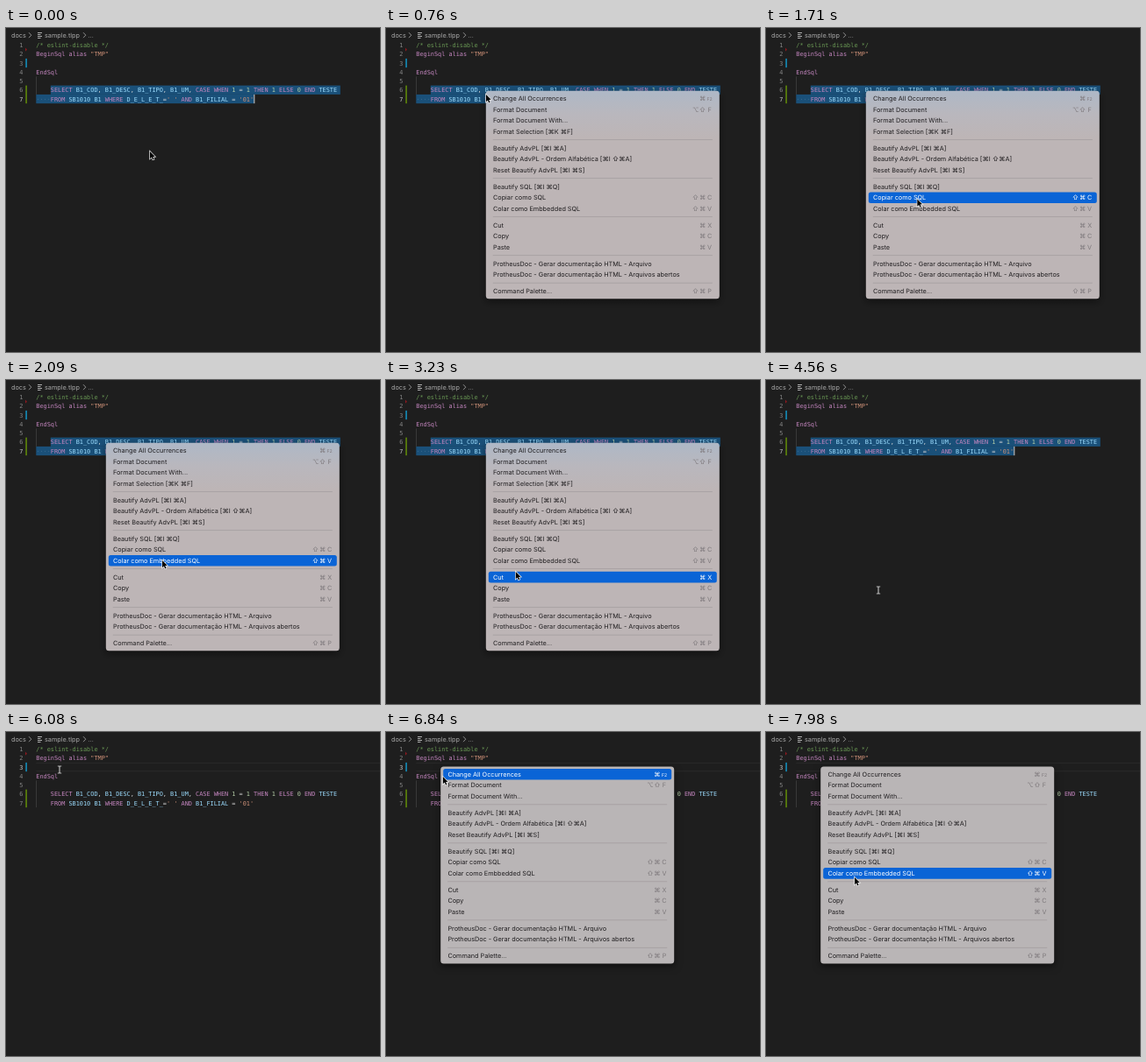
Write an HTML page with a canvas that moves like this. It is 426 px wide and 370 px high and loops after 8 s.

```html
<!DOCTYPE html>
<html lang="en">
<head>
<meta charset="utf-8">
<title>SQL paste menu</title>
<style>
html, body { margin: 0; width: 100%; height: 100%; overflow: hidden; background: #1e1e1e; }
canvas { display: block; }
</style>
</head>
<body>
<canvas id="stage" width="426" height="370"></canvas>
<script>
const ctx = document.getElementById('stage').getContext('2d');
const LOOP = 8000, STEP = 190;
const MONO = '6.86px "DejaVu Sans Mono", monospace';
const SANS = 'Inter, "DejaVu Sans", sans-serif';
const CHAR = 4.13, LINE = 10.25, CODE_X = 34.3;
const ROW = 12.55, GAP = 6.35, PAD = 2.5, MENU_W = 266;

const code = [
  '/* eslint-disable */',
  'BeginSql alias "TMP"',
  '',
  'EndSql',
  '',
  "    SELECT B1_COD, B1_DESC, B1_TIPO, B1_UM, CASE WHEN 1 = 1 THEN 1 ELSE 0 END TESTE",
  "    FROM SB1010 B1 WHERE D_E_L_E_T_=' ' AND B1_FILIAL = '01'"
];
const syntax = [
  [/^\/\*/, '#6a9955'],
  [/^['"]/, '#ce9178'],
  [/^(BeginSql|alias|EndSql|SELECT|CASE|WHEN|THEN|ELSE|END|FROM|WHERE|AND)$/, '#c586c0'],
  [/^\d/, '#b5cea8'],
  [/^\w/, '#9cdcfe'],
  [/./, '#d4d4d4']
];

// Label and shortcut keys; null is a separator.
const items = [
  ['Change All Occurrences', '⌘ F2'],
  ['Format Document', '⌥ ⇧ F'],
  ['Format Document With...'],
  ['Format Selection [⌘K ⌘F]'],
  null,
  ['Beautify AdvPL [⌘I ⌘A]'],
  ['Beautify AdvPL - Ordem Alfabética [⌘I ⇧⌘A]'],
  ['Reset Beautify AdvPL [⌘I ⌘S]'],
  null,
  ['Beautify SQL [⌘I ⌘Q]'],
  ['Copiar como SQL', '⇧ ⌘ C'],
  ['Colar como Embbedded SQL', '⇧ ⌘ V'],
  null,
  ['Cut', '⌘ X'],
  ['Copy', '⌘ C'],
  ['Paste', '⌘ V'],
  null,
  ['ProtheusDoc - Gerar documentação HTML - Arquivo'],
  ['ProtheusDoc - Gerar documentação HTML - Arquivos abertos'],
  null,
  ['Command Palette...', '⇧ ⌘ P']
];

// Pointer path: time, x, y.
const path = [
  [0, 164, 141], [570, 114, 72], [760, 114, 76], [1900, 177, 205], [2090, 178, 206],
  [2280, 168, 207], [2660, 158, 207], [2850, 158, 207], [3800, 129, 241], [4370, 129, 241],
  [4560, 128, 240], [5130, 61, 43], [6080, 61, 43], [6270, 62, 42], [6650, 62, 42],
  [7790, 101, 165], [7980, 101, 166]
];

function pointerAt(t) {
  const i = path.findIndex(p => p[0] >= t);
  if (i <= 0) return path[i < 0 ? path.length - 1 : 0].slice(1);
  const [t0, x0, y0] = path[i - 1], [t1, x1, y1] = path[i];
  const u = (t - t0) / (t1 - t0), k = u * u * (3 - 2 * u);
  return [x0 + (x1 - x0) * k, y0 + (y1 - y0) * k];
}

function rect(x, y, w, h, color) {
  ctx.fillStyle = color;
  ctx.fillRect(x, y, w, h);
}

function box(x, y, w, h, r, fill) {
  ctx.beginPath();
  ctx.roundRect(x, y, w, h, r);
  ctx.fillStyle = fill;
  ctx.fill();
}

function text(str, x, y, color, font, align = 'left') {
  ctx.font = font;
  ctx.textAlign = align;
  ctx.fillStyle = color;
  ctx.fillText(str, x, y);
}

function shape(points, fill, stroke, width) {
  ctx.beginPath();
  points.forEach(([x, y]) => ctx.lineTo(x, y));
  if (fill) ctx.closePath();
  ctx.lineWidth = width;
  ctx.strokeStyle = stroke;
  if (stroke) ctx.stroke();
  ctx.fillStyle = fill;
  if (fill) ctx.fill();
}

function drawBreadcrumb() {
  const font = '7.3px ' + SANS, gray = '#a9a9a9';
  text('docs', 6, 11, gray, font);
  text('sample.tlpp', 44, 11, gray, font);
  text('...', 93.5, 11, gray, font);
  for (const x of [26, 88]) shape([[x, 5.2], [x + 2.8, 8.2], [x, 11.2]], null, gray, 0.8);
  [5, 7, 9, 11].forEach((y, i) => rect(36, y, i % 2 ? 3.5 : 5, 0.9, '#c0c0c0'));
}

function drawEditor(selected, caret) {
  const top = n => 14.4 + (n - 1) * LINE;
  if (selected) {
    rect(50.8, top(6), 330, LINE, '#1a5079');
    rect(CODE_X, top(7), 248.3, LINE, '#1a5079');
    for (let i = 0; i < 4; i++) rect(CODE_X + (i + 0.4) * CHAR, top(7) + 5, 0.8, 0.8, '#4c7797');
  } else {
    rect(CODE_X, top(3), 392, 0.9, '#2b2b2b');
    rect(CODE_X, top(4) - 0.9, 392, 0.9, '#2b2b2b');
  }
  rect(CODE_X, top(5), 0.7, LINE * (selected ? 2 : 3), '#454545');
  rect(22.2, top(3), 1.8, LINE, '#1580a8');
  rect(22.2, top(6), 1.8, LINE * 2, '#587c0c');
  shape([[22, 22.6], [24, 24.7], [22, 26.8]], '#8c1a1f');

  const active = selected ? 7 : 3;
  code.forEach((line, i) => {
    const y = top(i + 1) + 7.6;
    text(i + 1, 19.3, y, i + 1 === active ? '#c6c6c6' : '#858585', MONO, 'right');
    for (const m of line.matchAll(/\/\*.*\*\/|'[^']*'|"[^"]*"|\w+|[^\s\w]/g)) {
      const color = syntax.find(([re]) => re.test(m[0]))[1];
      text(m[0], CODE_X + m.index * CHAR, y, color, MONO);
    }
  });
  if (caret) rect(282.3, top(7), 1, LINE, '#d0d0d0');
}

function drawMenu(left, top, list, fill, px, py, hoverable) {
  const height = list.reduce((h, it) => h + (it ? ROW : GAP), PAD * 2);
  ctx.save();
  ctx.shadowColor = 'rgba(0,0,0,.5)';
  ctx.shadowBlur = 9;
  ctx.shadowOffsetY = 3;
  box(left, top, MENU_W, height, 3.5, fill);
  ctx.restore();

  let y = top + PAD;
  for (const item of list) {
    if (!item) {
      rect(left + 8, y + GAP / 2 - 0.4, MENU_W - 16, 0.8, '#a39d9f');
      y += GAP;
      continue;
    }
    const [label, keys = ''] = item;
    const hover = hoverable && px > left + 2 && py >= y && py < y + ROW;
    if (hover) box(left + 3, y, MENU_W - 6, ROW, 2.5, '#0a64d6');
    const base = y + ROW / 2 + 2.6;
    text(label, left + 8.2, base, hover ? '#fff' : '#1f1d1f', '7.25px ' + SANS);
    keys.split(' ').reverse().forEach((key, i) => {
      const font = (key === 'F2' ? 5.2 : 7.25) + 'px ' + SANS;
      text(key, left + 254.8 - i * 8, base, hover ? '#fff' : '#7d787b', font, 'center');
    });
    y += ROW;
  }
}

function drawArrow(x, y) {
  const outline = [[0, 0], [0, 8.2], [1.9, 6.5], [3.2, 9.4], [4.5, 8.8], [3.2, 6], [5.7, 5.8]];
  shape(outline.map(([dx, dy]) => [x + dx, y + dy]), '#000', '#f0f0f0', 1.4);
}

function drawIBeam(x, y) {
  for (const [grow, color] of [[0.5, '#111'], [0, '#e4e4e4']]) {
    const bar = (dx, dy, w, h) =>
      rect(x + dx - grow, y + dy - grow, w + grow * 2, h + grow * 2, color);
    bar(-0.5, -4, 1, 8);
    bar(-2.3, -4.4, 4.6, 0.8);
    bar(-2.3, 3.6, 4.6, 0.8);
  }
}

const tinted = ctx.createLinearGradient(0, 72, 0, 125);
tinted.addColorStop(0, '#aeb8c6');
tinted.addColorStop(0.5, '#b9b7bd');
tinted.addColorStop(1, '#bdb5b6');
const shortList = items.filter(it => !it || !it[0].startsWith('Format Selection'));

function frame(now) {
  const t = Math.floor((now % LOOP) / STEP) * STEP;
  const [x, y] = pointerAt(t);
  const firstMenu = t >= 570 && t < 4370, secondMenu = t >= 6270;
  const selected = t < 5320;

  ctx.textRendering = 'geometricPrecision';
  rect(0, 0, 426, 370, '#1e1e1e');
  drawBreadcrumb();
  drawEditor(selected, selected && !firstMenu);
  if (firstMenu) drawMenu(113.8, 71.8, items, tinted, x, y, t < 4180);
  if (secondMenu) drawMenu(62.2, 39.5, shortList, '#b9b5b6', x, y, true);
  if (t >= 4370 && !secondMenu) drawIBeam(x, y);
  else drawArrow(x, y);
  requestAnimationFrame(frame);
}
requestAnimationFrame(frame);
</script>
</body>
</html>
```
